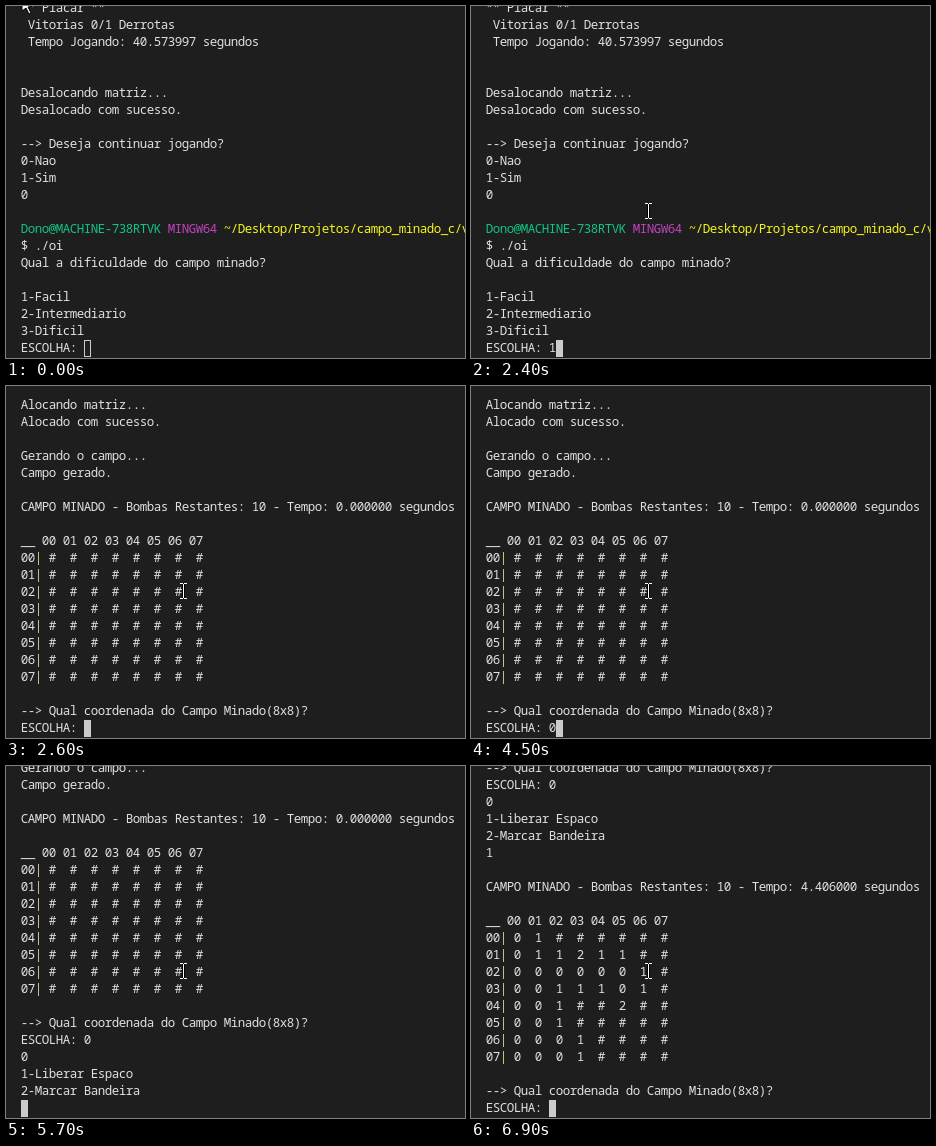
These frames come from a looping animation (459x352 px, 8000 ms). An HTML page with a canvas:

```html
<!DOCTYPE html>
<html lang="pt">
<head>
<meta charset="utf-8">
<title>Campo minado</title>
<style>
  html, body { margin: 0; width: 100%; height: 100%; overflow: hidden; background: #1e1e1e; }
  canvas { display: block; }
</style>
</head>
<body>
<canvas id="stage" width="459" height="352"></canvas>
<script>
const ctx = document.getElementById('stage').getContext('2d', { alpha: false });
const LOOP = 8000;
const LEFT = 15, TOP = -6, CELL = 7, ROW = 17, ROWS = 21;
const SIZE = 8;
const BG = '#1e1e1e', TEXT = '#e0e0e0', CARET = '#cccccc';
const FONT = '12.5px "Noto Sans Mono", "DejaVu Sans Mono", monospace';
const TINT = { '|': '#dccb8c', '*': '#d8c27c' };
const HOST = 'Dono@MACHINE-738RTVK';
const PROMPT_COLORS = ['#12c481', '#c044c0', '#f5f51c'];

// Mines as row and column digits.
const mines = new Set('02 04 27 43 55 56 64 67 76 77'.split(' '));

function countMines(r, c) {
  let n = 0;
  for (let y = r - 1; y <= r + 1; y++) {
    for (let x = c - 1; x <= c + 1; x++) n += mines.has(`${y}${x}`);
  }
  return n;
}

// Opens a cell and spreads sideways, up and down through the zeros.
function reveal(grid, r, c) {
  if (grid[r]?.[c] !== '#') return;
  grid[r][c] = countMines(r, c);
  if (grid[r][c] > 0) return;
  reveal(grid, r - 1, c);
  reveal(grid, r + 1, c);
  reveal(grid, r, c - 1);
  reveal(grid, r, c + 1);
}

const status = time => `CAMPO MINADO - Bombas Restantes: 10 - Tempo: ${time} segundos\n`;

function board(grid) {
  const head = '__ ' + grid.map((_, i) => `0${i}`).join(' ');
  const rows = grid.map((cells, i) => `0${i}| ${cells.join('  ')}`);
  return `\n${[head, ...rows].join('\n')}\n\n--> Qual coordenada do Campo Minado(8x8)?\nESCOLHA: `;
}

const hidden = Array.from({ length: SIZE }, () => Array(SIZE).fill('#'));
const opened = hidden.map(row => [...row]);
reveal(opened, 0, 0);

const intro = `** Placar **
 Vitorias 0/1 Derrotas
 Tempo Jogando: 40.573997 segundos


Desalocando matriz...
Desalocado com sucesso.

--> Deseja continuar jogando?
0-Nao
1-Sim
0

${HOST} MINGW64 ~/Desktop/Projetos/campo_minado_c/v
$ ./oi
Qual a dificuldade do campo minado?

1-Facil
2-Intermediario
3-Dificil
ESCOLHA: `;

const setup = `
Alocando matriz...
Alocado com sucesso.

Gerando o campo...
Campo gerado.

`;

// Text that reaches the terminal, with its time in ms.
const output = [
  [0, intro],
  [2400, '1'],
  [2500, '\n'],
  [2600, setup + status('0.000000') + board(hidden)],
  [4500, '0'],
  [5300, '\n'],
  [5600, '0'],
  [5700, '\n1-Liberar Espaco\n2-Marcar Bandeira\n'],
  [6700, '1'],
  [6800, '\n\n' + status('4.406000')],
  [6900, board(opened)]
];

function drawText(text, col, y, color) {
  [...text].forEach((ch, i) => {
    ctx.fillStyle = TINT[ch] || color;
    ctx.fillText(ch, LEFT + (col + i) * CELL - 0.25, y + 12);
  });
}

function drawLine(line, y) {
  if (!line.startsWith(HOST)) return drawText(line, 0, y, TEXT);
  let col = 0;
  line.split(' ').forEach((word, i) => {
    drawText(word, col, y, PROMPT_COLORS[i]);
    col += word.length + 1;
  });
}

function drawCaret(col, focused) {
  const x = LEFT + col * CELL, y = TOP + (ROWS - 1) * ROW;
  ctx.fillStyle = CARET;
  ctx.fillRect(x, y, CELL, ROW);
  if (focused) return;
  ctx.fillStyle = BG;
  ctx.fillRect(x + 1, y + 1, CELL - 2, ROW - 2);
}

function drawArrow(x, y) {
  ctx.save();
  ctx.translate(x, y);
  const arrow = new Path2D('M0 0V16L4 13L7 19L9 18L6 12L11 11Z');
  ctx.fillStyle = '#fff';
  ctx.fill(arrow);
  ctx.strokeStyle = '#000';
  ctx.lineWidth = 1;
  ctx.stroke(arrow);
  ctx.restore();
}

function drawBeam(x, y) {
  ctx.fillStyle = '#000';
  ctx.fillRect(x - 1, y - 7, 3, 14);
  ctx.fillStyle = '#fff';
  ctx.fillRect(x, y - 7, 1, 14);
  for (const end of [y - 8, y + 7]) {
    ctx.fillRect(x - 3, end, 3, 1);
    ctx.fillRect(x + 1, end, 3, 1);
  }
}

// Eased progress from 0 to 1 between two times.
function ease(t, from, to) {
  const p = Math.min(1, Math.max(0, (t - from) / (to - from)));
  return 1 - (1 - p) ** 2;
}

function drawPointer(t) {
  if (t < 300) return drawArrow(16, -11);
  const tick = Math.floor(t / 100) * 100;
  const sweep = ease(tick, 200, 600), settle = ease(tick, 900, 1100);
  drawBeam(Math.round(16 + 153 * sweep + 8 * settle), Math.round(209 * sweep - 4 * settle));
}

function draw(t) {
  ctx.fillStyle = BG;
  ctx.fillRect(0, 0, 459, 352);
  ctx.font = FONT;
  const printed = output.filter(([at]) => at <= t).map(([, text]) => text).join('');
  const lines = printed.split('\n').slice(-ROWS);
  lines.forEach((line, row) => drawLine(line, TOP + row * ROW));
  drawCaret(lines[ROWS - 1].length, t >= 1100);
  drawPointer(t);
}

const start = performance.now();
function tick() {
  draw((performance.now() - start) % LOOP);
  requestAnimationFrame(tick);
}
tick();
</script>
</body>
</html>
```
